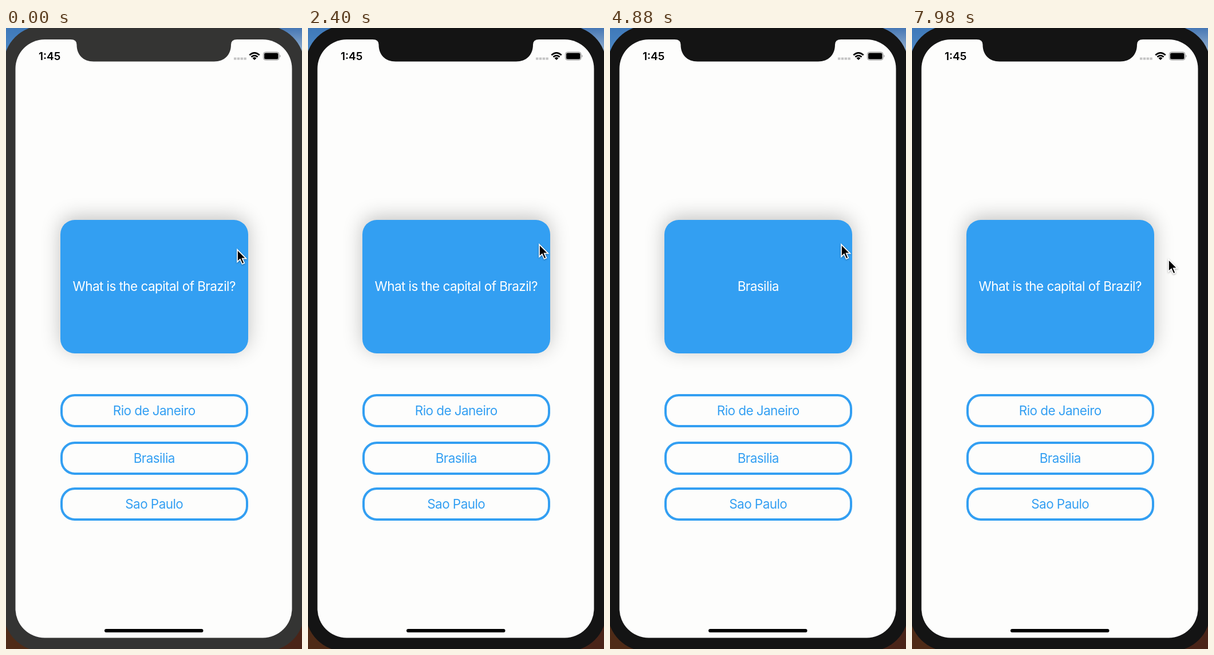
Recreate the animation shown at these times as an HTML page. Size 517 by 1084 pixels, loop 8000 ms.

```html
<!DOCTYPE html>
<html lang="en">
<head>
<meta charset="utf-8">
<title>Quiz flip card</title>
<style>
  html, body { margin: 0; width: 100%; height: 100%; overflow: hidden; }
  body {
    position: relative;
    background: linear-gradient(#4677b4, #93b0cf 40px) right top / 50% 50% no-repeat,
                linear-gradient(#3f79b9, #4b87c4 40px) left top / 50% 50% no-repeat,
                linear-gradient(90deg, #4f2b17, #4a2418) bottom / 100% 50% no-repeat;
    font: 400 22.5px/1 Inter, "Open Sans", sans-serif;
    letter-spacing: -.025em;
  }
  #stage { position: absolute; left: 0; top: 0; width: 517px; height: 1084px; overflow: hidden; }
  svg { position: absolute; left: 0; top: 0; overflow: visible; }
  #bezel { color: #343433; }
  .time { font-weight: 600; font-size: 19px; letter-spacing: 0; }
  .box {
    position: absolute; left: 95px; width: 327.5px; box-sizing: border-box;
    display: flex; align-items: center; justify-content: center; white-space: nowrap;
  }
  .option { height: 58px; border: 4px solid #339ff2; border-radius: 25px; color: #339ff2; }
  #card { top: 335px; height: 233px; transform-style: preserve-3d; }
  .face {
    position: absolute; inset: 0; display: flex; align-items: center; justify-content: center;
    border-radius: 25px; background: #339ff2; color: #fff;
    box-shadow: 0 -5px 34px rgba(0, 0, 0, .24);
    backface-visibility: hidden;
  }
  .back { transform: rotateY(180deg); }
  #cursor { filter: drop-shadow(0 1.5px 1.5px rgba(0, 0, 0, .35)); }
</style>
</head>
<body>
<div id="stage">
  <svg id="bezel" width="517" height="1084">
    <rect x="-4" y="-4" width="525" height="1092" rx="68" fill="currentColor"/>
    <rect x="16.5" y="20" width="483" height="1044.5" rx="51" fill="#fdfdfc"/>
    <path fill="currentColor" d="M113 19V20Q123.5 20 123.5 29C123.5 47 135 58.5 153 58.5H363.5C381.5 58.5 393 47 393 29Q393 20 403.5 20V19Z"/>
    <g fill="#000">
      <text class="time" x="57" y="56">1:45</text>
      <rect x="172" y="1049" width="172.5" height="6" rx="3"/>
      <rect x="451" y="43.5" width="24.5" height="11" rx="2.5"/>
      <path d="M478.5 46.5q2 2.5 0 5z" fill="#777"/>
      <path d="M434 56L430.5 52.5Q434 49.7 437.5 52.5Z"/>
    </g>
    <rect x="449.5" y="42" width="27.5" height="14" rx="4" fill="none" stroke="#888"/>
    <path d="M425.3 47.3Q434 39.3 442.7 47.3M428.4 50.6Q434 45.6 439.6 50.6" fill="none" stroke="#000" stroke-width="2.7"/>
    <path d="M398 53.5H420" stroke="#c4c4c4" stroke-width="4" stroke-dasharray="4.4 1.4"/>
  </svg>

  <div class="box" id="card">
    <div class="face">What is the capital of Brazil?</div>
    <div class="face back">Brasilia</div>
  </div>
  <div class="box option" style="top:639px">Rio de Janeiro</div>
  <div class="box option" style="top:722px">Brasilia</div>
  <div class="box option" style="top:802px">Sao Paulo</div>

  <svg id="cursor" width="20" height="30">
    <path d="M1 1.8V23.2L5.9 18.7L9.6 27L13.3 25.4L9.7 17.4H16.4Z" stroke="#fff" stroke-width="1.7"/>
  </svg>
</div>
<script>
  const LOOP = 8000;

  // Each step: [time in ms, value, easing towards the next step]
  function play(id, property, steps) {
    const frames = steps.map(([time, value, easing = 'linear']) =>
      ({ offset: time / LOOP, [property]: value, easing }));
    document.getElementById(id).animate(frames, { duration: LOOP, iterations: Infinity });
  }

  const at = (x, y) => `translate(${x}px, ${y}px)`;
  const turn = angle => `perspective(1250px) rotateY(${angle}deg)`;

  play('cursor', 'transform', [
    [0, at(403, 385)],
    [100, at(403, 385), 'ease-in-out'],
    [700, at(403, 376)],
    [7580, at(403, 376), 'ease-in-out'],
    [7970, at(447, 402)],
    [LOOP, at(447, 402)]
  ]);

  play('bezel', 'color', [
    [0, '#343433', 'step-end'],
    [2060, '#141414'],
    [LOOP, '#141414']
  ]);

  play('card', 'transform', [
    [0, turn(0)],
    [2640, turn(0)],
    [3140, turn(180)],
    [5180, turn(180)],
    [5680, turn(0)],
    [LOOP, turn(0)]
  ]);
</script>
</body>
</html>
```
